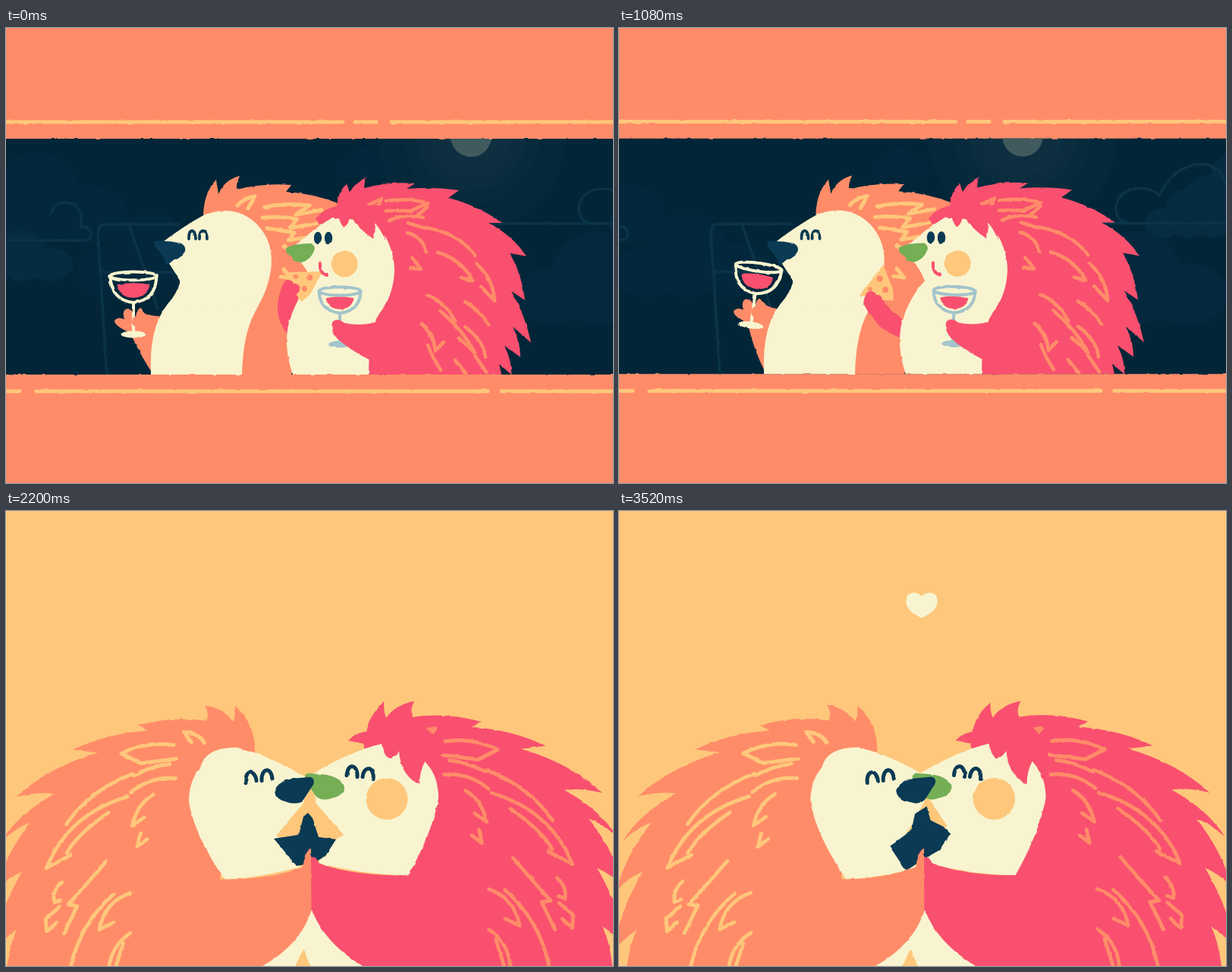
Animation, 800 px wide and 600 px high, one loop 3560 ms. Source, as an HTML page with a canvas:

```html
<!DOCTYPE html>
<html lang="en">
<head>
<meta charset="utf-8">
<title>Hedgehog date</title>
<style>
html, body { margin: 0; width: 100%; height: 100%; overflow: hidden; background: #fec77b; }
canvas { position: fixed; left: -20px; top: -20px; filter: url(#rough); }
svg { position: absolute; }
</style>
</head>
<body>
<svg width="0" height="0">
  <filter id="rough" x="0" y="0" width="100%" height="100%" color-interpolation-filters="sRGB">
    <feTurbulence type="fractalNoise" baseFrequency=".1" numOctaves="2" seed="4" result="noise"/>
    <feDisplacementMap in="SourceGraphic" in2="noise" scale="2.6" xChannelSelector="R" yChannelSelector="G"/>
  </filter>
</svg>
<canvas width="840" height="640"></canvas>
<script>
const LOOP = 3560, CUT = 1880, STEP = 40;
const ORANGE = '#ff8c69', TAN = '#fec77b', SKY = '#022638', CREAM = '#f8f4cf',
      PINK = '#f9506f', INK = '#0a3a54', GREEN = '#74ae55', GLASS = '#a3c4cb';
const ctx = document.querySelector('canvas').getContext('2d');

// ---- helpers ----
const lerp = (a, b, k) => a + (b - a) * k;

function fill(d, color) {
  ctx.fillStyle = color;
  ctx.fill(new Path2D(d));
}

function line(d, color, width) {
  ctx.strokeStyle = color;
  ctx.lineWidth = width;
  ctx.stroke(new Path2D(d));
}

function oval(x, y, rx, ry, color) {
  ctx.fillStyle = color;
  ctx.beginPath();
  ctx.ellipse(x, y, rx, ry, 0, 0, 7);
  ctx.fill();
}

function group(draw, x = 0, y = 0, angle = 0, px = 0, py = 0) {
  ctx.save();
  ctx.translate(x + px, y + py);
  ctx.rotate(angle);
  ctx.translate(-px, -py);
  draw();
  ctx.restore();
}

// Eased value from [time, value] pairs.
function key(t, keys) {
  if (t <= keys[0][0]) return keys[0][1];
  for (let i = 1; i < keys.length; i++) {
    const [t0, v0] = keys[i - 1], [t1, v1] = keys[i];
    if (t < t1) {
      const k = (t - t0) / (t1 - t0);
      return lerp(v0, v1, k * k * (3 - 2 * k));
    }
  }
  return keys[keys.length - 1][1];
}

// Polygon between two poses.
function morph(a, b, k, color) {
  const pts = a.map((v, i) => lerp(v, b[i], k));
  fill('M' + pts.join(' ') + 'Z', color);
}

// ---- train scene ----
function cloud(x, y, r, color) {
  oval(x, y, r, r, color);
  oval(x - r, y + r * .4, r * .75, r * .6, color);
  oval(x + r * 1.1, y + r * .35, r * .9, r * .65, color);
}

function night(t) {
  ctx.fillStyle = SKY;
  ctx.fillRect(-20, 146, 840, 311);
  const moon = 613 - t * .075;
  for (const r of [125, 90, 72, 52]) oval(moon, 143, r, r, 'rgba(70,110,110,.04)');
  oval(moon, 143, 27, 27, '#405a5e');

  const drift = -t * .093;
  group(() => {
    cloud(40, 225, 60, '#03283d');
    cloud(20, 300, 34, '#062c41');
    cloud(190, 300, 55, '#03283d');
    cloud(470, 178, 20, '#03283d');
    cloud(780, 330, 62, '#04293e');
    cloud(930, 205, 50, '#062c41');
    cloud(850, 245, 32, '#062c41');
    line('M773 258Q755 256 755 236Q759 212 789 212Q805 212 813 222Q830 182 867 180Q895 180 901 210M773 258H1000', '#0c3549', 3);
    line('M-60 280H100Q112 281 112 272Q112 262 98 262Q104 232 78 230Q62 232 60 244', '#0c3549', 3);
  }, drift);
  line('M133 457L121 272Q121 259 132 259H228M163 262L200 370M128 322H228M600 258H800', '#0b3448', 3.5);
}

function wineGlass(x, rimY, rx, depth, color, stem) {
  const L = x - rx, R = x + rx, b = rimY + depth;
  const top = rimY + depth * .32, low = rimY + depth * .82;
  fill(`M${L + 9} ${top}Q${x} ${top - 4} ${R - 9} ${top}Q${R - 12} ${low} ${x} ${low}Q${L + 12} ${low} ${L + 9} ${top}`, PINK);
  line(`M${L} ${rimY}Q${L + 1} ${b - 3} ${x} ${b}Q${R - 1} ${b - 3} ${R} ${rimY}M${x} ${b}V${b + stem}`, color, 4);
  ctx.beginPath();
  ctx.ellipse(x, rimY, rx, 5.5, 0, 0, 7);
  ctx.stroke();
  oval(x, b + stem + 2, rx * .54, 4.5, color);
}

function drinker(t) {
  const tilt = key(t, [[0, 0], [600, .08], [780, .08], [1300, -.06], [1760, -.08], [1900, -.07]]);
  const sip = key(t, [[120, 0], [620, 1], [820, 1], [1250, 0]]);
  const lean = key(t, [[900, 0], [1400, 1], [1760, 1.4]]);

  const hx = sip * 25 - lean * 2, hy = -sip * 37 + lean * 3;
  fill('M330 280L430 240L420 320L376 457H305Z', ORANGE);
  fill(`M194 457Q${175 + hx * .3} ${428 + hy * .2} ${164 + hx * .7} ${402 + hy}Q${143 + hx} ${393 + hy} ${143 + hx} ${386 + hy}Q${147 + hx} ${380 + hy} ${156 + hx} ${384 + hy}Q${152 + hx} ${371 + hy} ${161 + hx} ${370 + hy}Q${168 + hx} ${373 + hy} ${171 + hx} ${382 + hy}Q${172 + hx} ${370 + hy} ${178 + hx} ${369 + hy}Q${183 + hx} ${380 + hy} ${202 + hx * .7} ${380 + hy * .8}L230 400Z`, ORANGE);

  group(() => {
    fill('M260 246Q261 217 277 200L280 219Q288 200 308 195Q303 206 304 213Q340 204 376 207L369 216Q405 218 440 232L420 340H330Z', ORANGE);
    line('M305 234Q314 224 328 222L319 238M341 236Q370 230 400 234L382 246L416 240M338 250Q362 248 384 252L374 264L412 257M344 264L380 270L372 280L398 276M366 288L384 298M366 318L376 330L362 328', TAN, 5);
  }, 0, 0, tilt, 320, 350);

  fill('M231 330Q226 350 213 364Q188 395 191 457H311Q312 405 328 375Q342 350 346 325L310 290Z', CREAM);
  group(() => {
    fill('M204 284Q236 260 262 246Q304 231 332 260Q354 284 349 320Q344 347 334 363L240 368L229 347Q232 336 225 326L212 306Z', CREAM);
    fill('M196 281Q214 280 231 284Q239 289 235 297Q231 303 222 305L212 313Q207 299 196 288Z', INK);
    line('M241 278C240 264 250 264 250 278M255 278C254 264 265 264 265 278', INK, 3.8);
  }, 0, 0, tilt, 320, 350);
  if (sip > .5) fill('M195 302L238 304Q236 322 212 321Z', PINK);

  group(() => wineGlass(168, 327, 30.5, 35, CREAM, 40),
    sip * 18 - lean, -sip * 38 + lean * 5, sip * .44 - lean * .06, 168, 404);
  oval(172 + hx, 387 + hy, 6, 7, ORANGE);
}

function cheeseHand(t) {
  const k = key(t, [[40, 0], [560, 1]]);
  return { k, x: lerp(375, 335, k), y: lerp(340, 354, k) + key(t, [[900, 0], [1440, 6]]) };
}

function cheese({ k, x, y }) {
  group(() => {
    fill('M44 2L-4 -22Q4 -8 -3 0L0 24L14 21Z', TAN);
    oval(25, 1, 4, 4, ORANGE);
    oval(12, 11, 4, 4, ORANGE);
    oval(9, -9, 3, 3, ORANGE);
  }, x + 3, y, lerp(-.5, -1.38, k));
  oval(x - 3, y + 1, 8, 9, PINK);
  oval(x + 6, y + 4, 6, 7, PINK);
}

function eater(t) {
  const hold = cheeseHand(t);
  fill('M408 252Q418 238 436 235Q437 217 449 205L453 217Q460 203 475 197Q471 206 473 211Q505 202 539 205L528 212Q565 209 597 214L583 224Q622 234 654 257L636 257Q668 274 686 301L664 297Q680 325 684 359L666 347Q684 378 692 415L668 394Q678 415 678 434L657 419Q667 440 666 457L650 443L653 457H440V300Z', PINK);
  line('M478 233L495 225L488 238M501 228Q530 224 556 231L534 241L501 241M505 254Q525 244 550 250M530 257L552 264M529 270Q550 276 554 296M535 303L547 318L533 317M555 236Q545 246 537 249M553 263Q598 271 618 300M569 296Q600 305 615 333L600 329M620 311Q642 330 644 360L626 341M556 352Q580 363 592 387M605 361Q624 372 636 391M572 373Q602 398 618 428L597 409M548 390Q563 404 566 425L577 415M605 394Q630 413 632 435M556 418Q562 434 573 451M592 438L606 455M618 432L633 454', ORANGE, 4.6);
  line(`M386 400Q${lerp(362, 352, hold.k)} ${lerp(382, 394, hold.k)} ${hold.x} ${hold.y + 6}`, PINK, 25);
  fill('M378 290Q403 266 430 250L490 258Q512 290 512 320Q511 348 497 370Q478 390 478 457H378Q365 420 373 388Q383 355 403 334Q397 318 386 306Z', CREAM);
  cheese(hold);
  fill('M408 252Q420 238 440 234L495 234L500 280Q493 264 486 257Q488 268 484 278Q466 266 453 248Q453 258 445 263Q439 256 438 246Q424 245 408 252', PINK);
  oval(411, 277, 5.2, 8.3, INK);
  oval(425, 277, 5.2, 8.3, INK);
  fill('M369 290Q380 284 402 284Q409 288 406 294Q402 305 390 309Q378 309 376 301Q368 298 369 290', GREEN);
  oval(446, 311, 17.5, 17.5, TAN);
  line('M414 310Q413 324 423 326', PINK, 4);

  const sway = key(t, [[0, 0], [360, -.02], [720, .09], [1100, .03], [1440, 0], [1760, .08], [1900, .09]]);
  group(() => wineGlass(440, 347, 27.5, 29, GLASS, 39), 0, 0, sway, 438, 417);
  const hand = sway * 40;
  fill(`M480 438Q452 424 ${436 + hand} 409Q${427 + hand} 399 ${430 + hand} 388Q${436 + hand} 381 ${446 + hand} 389Q468 394 491 387L530 440Z`, PINK);
}

function train(t) {
  const bounce = key(t, [[0, 0], [240, 2], [480, -3], [720, -.6], [940, 2.5], [1200, -3], [1440, -2.6], [1600, 2], [1760, -1.5], [1900, 0]]);
  ctx.fillStyle = ORANGE;
  ctx.fillRect(-20, -20, 840, 640);
  group(() => {
    ctx.save();
    ctx.beginPath();
    ctx.rect(-20, 146, 840, 311);
    ctx.clip();
    night(t);
    drinker(t);
    eater(t);
    ctx.restore();
    line('M-20 124H443M460 124H488M508 124H820M-20 479H18M40 479H635M653 479H820', TAN, 5);
  }, 0, bounce);
}

// ---- kiss scene ----
function heart(t) {
  const age = t - 2640;
  if (age < 0) return;
  const y = 123 + 217 * Math.exp(-age / 160);
  const size = Math.min(1, age / 120) * (41 + 7 * Math.exp(-Math.max(0, age - 280) / 250));
  ctx.save();
  ctx.translate(399, y);
  ctx.scale(size / 48, size / 48);
  fill('M0 -13C6 -21 24 -22 24 -6C24 7 10 15 0 20C-10 15 -24 7 -24 -6C-24 -22 -6 -21 0 -13', CREAM);
  ctx.restore();
}

// Both lovers share one drawing facing left; the left one is mirrored.
function side(left, shift, y, draw) {
  ctx.save();
  if (left) {
    ctx.translate(804, 5);
    ctx.scale(-1, 1);
  }
  ctx.translate(shift, y);
  draw();
  ctx.restore();
}

// The coat widens towards the bottom with each breath.
function coat(left, breath) {
  const slant = .1 * breath;
  ctx.save();
  ctx.transform(1, 0, slant, 1, -374 * slant, -2 * breath);
  fill('M469 313Q473 278 501 255Q499 268 502 276Q515 259 541 254Q533 267 537 275Q580 268 627 281L613 288Q668 292 709 313L676 317Q738 335 778 375Q752 368 728 371Q774 398 792 433Q775 416 757 409Q788 455 794 499Q780 482 762 474Q789 530 790 578Q776 560 762 551Q773 578 770 640H500V480Z', left ? ORANGE : PINK);
  line('M537 304Q545 291 565 290L554 303M577 307Q612 301 645 318L618 331L572 325M580 332Q602 334 626 347M571 351Q602 347 628 369M628 345Q682 366 709 411M632 375Q708 398 730 469L700 452M655 396Q694 425 705 449M598 372Q618 384 622 413L607 402M611 424L613 441L601 431M652 460Q676 492 697 517L685 519L699 555M708 487Q720 498 716 514L708 511M708 520L725 536L722 553L710 541M617 502Q650 514 653 550L635 541M638 503Q680 542 687 604M612 555Q636 572 636 604M620 568L628 604', left ? TAN : ORANGE, 5);
  ctx.restore();
}

function lover(left, shift, y, breath) {
  const back = left ? 551 : 562, jaw = left ? 504 : 522;
  side(left, shift, y, () => {
    coat(left, breath);
    fill(`M392 350Q445 318 488 308Q530 308 ${back - 15} 335Q${back} 352 ${back} 380Q${back - 8} 425 ${jaw} 482Q465 481 405 466L400 380Z`, CREAM);
    if (!left) {
      fill('M443 304Q455 291 475 292L537 278L566 310L560 352Q555 337 545 330Q537 344 537 362Q512 350 510 318Q502 329 496 328Q487 318 487 306Q465 314 463 308Z', PINK);
      oval(494, 381, 27.5, 27.5, TAN);
    }
    line('M441 350C442 333 456 335 455 352M462 352C464 336 478 338 476 355', INK, 5);
  });
}

function nose(left, shift, y) {
  side(left, shift, y, () =>
    fill('M438 365Q434 353 414 349L391 347Q384 349 387 357L400 377Q408 385 421 380Q437 377 438 365', left ? INK : GREEN));
}

function arm(left, shift, y) {
  const jaw = (left ? 504 : 522) + shift, top = left ? 440 : 455;
  side(left, 0, y, () =>
    fill(`M402 ${top - y}Q408 ${top - y} 413 466Q455 482 ${jaw} 482L560 480V640H401Z`, left ? ORANGE : PINK));
}

function kiss(t) {
  const near = key(t, [[CUT, -1.2], [2200, 0], [2500, 1], [2920, 1], [3520, .94]]);
  const pose = Math.max(0, near);
  const breath = .5 - .5 * Math.cos((t - 2920) / 1200 * 2 * Math.PI);
  const y = -1.5 * breath;
  const shiftL = (1 - near) * 12, shiftR = (1 - near) * 8;

  ctx.fillStyle = TAN;
  ctx.fillRect(-20, -20, 840, 640);
  heart(t);
  lover(false, shiftR, y, breath);
  lover(true, shiftL, y, breath);
  morph([400, 376, 356, 428, 398, 455, 445, 427], [407, 376, 382, 422, 405, 440, 432, 415], pose, TAN);
  morph([353, 432, 386, 427, 392, 403, 398, 398, 404, 405, 412, 430, 435, 433, 421, 455, 406, 464, 383, 468],
        [357, 443, 385, 421, 390, 399, 406, 389, 411, 408, 428, 415, 437, 425, 422, 447, 404, 457, 378, 475], pose, INK);
  nose(false, shiftR, y);
  nose(true, shiftL, y);
  arm(false, shiftR, y);
  arm(true, shiftL, y);
  fill('M403 526Q420 570 470 600L500 640H300L338 600Q388 572 403 526', CREAM);
  const gap = lerp(392, 384, pose);
  fill(`M${gap} 578L${gap + 10} 602V640H${gap - 12}V602Z`, TAN);
}

// ---- loop ----
let start;
function frame(now) {
  start ??= now;
  const t = Math.floor((now - start) % LOOP / STEP) * STEP;
  ctx.setTransform(1, 0, 0, 1, 20, 20);
  ctx.lineCap = ctx.lineJoin = 'round';
  (t < CUT ? train : kiss)(t);
  requestAnimationFrame(frame);
}
requestAnimationFrame(frame);
</script>
</body>
</html>
```
